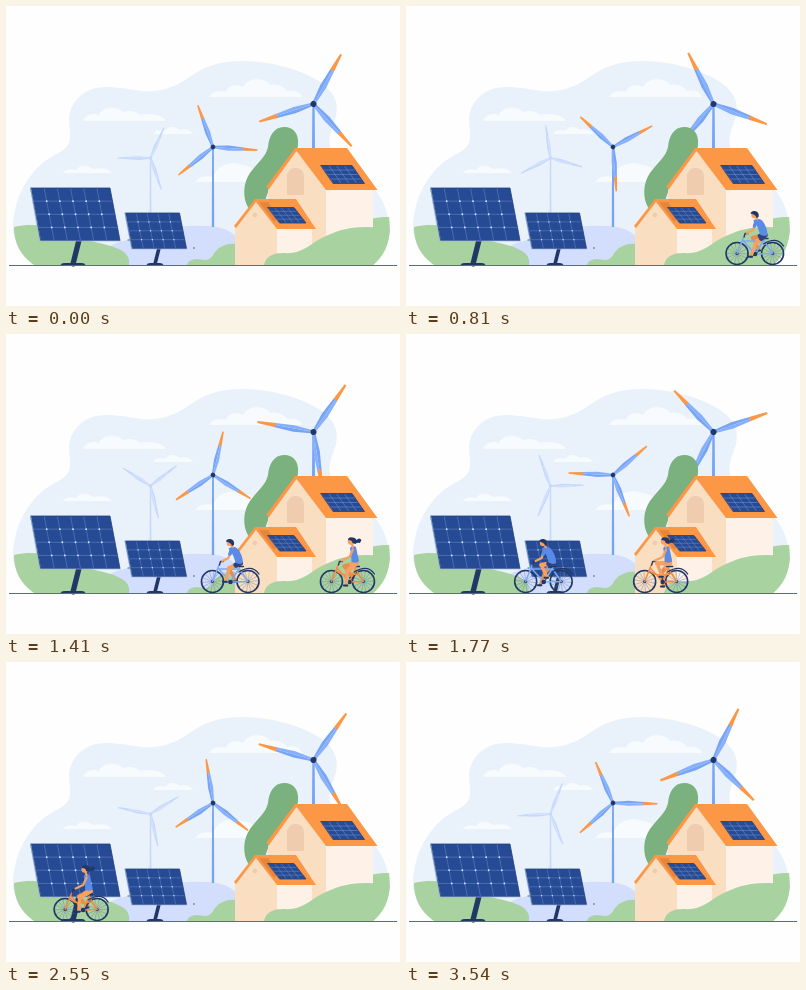
Write an HTML page that moves like this. It is 394x300 px and loops after 3570 ms.

```html
<!DOCTYPE html>
<html lang="en">
<head>
<meta charset="utf-8">
<title>Green energy</title>
<style>
  html, body { margin: 0; width: 100%; height: 100%; overflow: hidden; background: #fefefe; }
  svg { display: block; }
</style>
</head>
<body>
<svg width="394" height="300" viewBox="0 0 394 300">
  <path fill="#e9f2fa" d="M20 245C10 236 7 232 7 222C7 202 14 181 30 163C45 147 63 147 64 132C65 121 59 110 69 96C82 77 104 80 128 84C151 88 168 82 182 72C201 58 218 55 236 55C264 55 293 63 311 74C328 84 333 96 330 110C327 121 322 128 324 140C329 161 355 165 369 184C379 196 383 210 384 225L378 245Z"/>
  <g fill="#f8fbfe">
    <path d="M77 115C80 108 88 107 93 109C97 100 111 100 117 106C124 104 130 105 134 109C145 106 158 110 160 115Z"/>
    <path d="M147 128C150 123 156 124 159 125C162 120 170 120 173 124C180 122 186 125 187 128Z"/>
    <path d="M203 91C206 85 215 84 220 86C223 77 233 79 237 81C242 71 259 71 264 79C272 78 278 80 281 85C289 83 295 87 296 91Z"/>
    <path d="M57 167C60 162 67 163 70 164C74 158 84 159 87 163C95 161 104 163 106 167Z"/>
    <path d="M189 176C194 169 203 170 207 171C211 157 228 155 236 159C246 160 256 167 262 176Z"/>
  </g>
  <path fill="#d3ddfc" d="M88 259C96 235 120 236 139 229C163 220 184 219 203 220C224 222 237 230 246 259Z"/>
  <path fill="#a8d29f" d="M28 259C17 251 8 240 8 221C29 216 53 221 70 230C87 237 98 237 110 242C121 246 124 252 123 259Z"/>
  <path fill="#a8d29f" d="M181 259C183 252 191 253 199 254C207 254 207 246 213 242C219 238 225 237 232 238V259Z"/>
  <path fill="#a8d29f" d="M330 240C345 215 365 211 383 211C386 232 379 248 367 259H330Z"/>
  <g id="turbines"></g>
  <path fill="#7ab17f" d="M243 203C236 192 237 177 244 167C251 157 260 151 262 141C263 130 268 121 278 121C288 121 293 128 292 139L290 150L262 186L258 198Z"/>

  <path fill="#f9dec2" d="M262 184L290 144L320 184V259H262Z"/>
  <path fill="#fef1e7" d="M320 183H367V245H320Z"/>
  <path fill="#fb9745" d="M289 142H341L371.500 184H320L290.500 145L263 183L260 181Z"/>
  <path fill="#efccae" d="M281 189V171C281 159 298 159 298 171V189Z"/>
  <path fill="#f9dec2" d="M229 222L250 195L271 223V259H229Z"/>
  <path fill="#fef1e7" d="M271 222H306V259H271Z"/>
  <path fill="#fb9745" d="M249 193H290L310 223H271L250 196L230 222L228 220Z"/>
  <path fill="#e3873d" d="M253 196H262L272 212L268 216Z"/>
  <circle cx="249" cy="209" r="2.300" fill="#efccae"/>
  <path fill="#a8d29f" d="M258 259C260 250 267 247 277 247C290 248 297 244 306 238C319 229 333 224 345 222C359 220 373 221 384 223C383 239 378 250 367 259Z"/>
  <g id="panels"></g>
  <path fill="none" stroke="#5d6b8a" d="M3 259.500H391"/>
  <g id="riders"></g>
</svg>
<script>
const LOOP = 3570, STEP = 30;
const NAVY = '#213767', SKIN = '#f6a062', BLUE = '#5a8ae6';
const $ = id => document.getElementById(id);
const line = (d, color, width) =>
  `<path d="${d}" fill="none" stroke="${color}" stroke-width="${width}" stroke-linecap="round" stroke-linejoin="round"/>`;
const fill = (d, color) => `<path d="${d}" fill="${color}"/>`;
const dot = (x, y, r, color) => `<circle cx="${x}" cy="${y}" r="${r}" fill="${color}"/>`;

// Parallelogram of solar cells: corner, top edge, side offset
function panel(x, y, w, dx, dy, cols, rows, weight, joint) {
  const at = (u, v) => [x + u * w + v * dx, y + v * dy];
  let grid = '', joints = '';
  for (let i = 1; i < cols; i++) grid += `M${at(i / cols, 0)}L${at(i / cols, 1)}`;
  for (let j = 1; j < rows; j++) {
    grid += `M${at(0, j / rows)}L${at(1, j / rows)}`;
    for (let i = 1; joint && i < cols; i++) joints += dot(...at(i / cols, j / rows), joint, '#dce8fc');
  }
  const edge = `M${at(0, 0)}L${at(1, 0)}L${at(1, 1)}L${at(0, 1)}Z`;
  return fill(edge, '#264b94') + line(grid, '#6d8dcb', weight) + joints + line(edge, '#203f82', .8);
}

const stand = (x, top, lean, half) =>
  line(`M${x + lean} ${top}L${x} 258`, NAVY, half * .42) +
  fill(`M${x - half} 260Q${x - half} 257 ${x - half + 4} 257H${x + half - 4}Q${x + half} 257 ${x + half} 260Z`, NAVY);

$('panels').innerHTML =
  stand(67, 234, 6, 12.5) + panel(25, 182, 79, 10, 52.5, 6, 4, .5, .9) +
  line('M24.500 182L33.500 235H114.500', '#9db7e6', .7) +
  stand(149, 242, 4, 8.5) + panel(119.5, 207, 54, 7, 35.5, 5, 4, .45, .7) +
  line('M119 207L125.500 243H181', '#9db7e6', .6) +
  line('M122 234H123M187.500 242H188.500', NAVY, .8) +
  panel(315, 159.500, 31, 12.500, 18, 4, 4, .6) +
  panel(262, 201.500, 26, 12, 15.500, 4, 4, .5);

const FAINT = ['#c6d8fc', '#d0dffd', '#c6d8fc', '#c6d8fc'];
const BRIGHT = ['#78a4f6', '#86b0fd', '#fb9745', NAVY];
const turbines = [
  { x: 144.5, y: 152, foot: 208, size: 33, start: 161, colors: FAINT },
  { x: 207, y: 141, foot: 221, size: 44.5, start: 231, colors: BRIGHT },
  { x: 307.5, y: 98, foot: 150, size: 57, start: 29, colors: BRIGHT }
];

function turbine({ x, y, foot, size, colors: [dark, light, tip, hub] }) {
  const blade = angle => `<g transform="rotate(${angle})">` +
    fill('M-1.500 0L-3.300 -20L-2.100 -39H0V0Z', dark) + fill('M1.500 0L3.300 -20L2.100 -39H0V0Z', light) +
    fill('M-2.200 -38.500L-1 -57H1L2.200 -38.500Z', tip) + '</g>';
  const w = size / 36;
  return fill(`M${x - w * .7} ${y}H${x + w * .7}L${x + w} ${foot}H${x - w}Z`, dark) +
    `<g class="rotor">${[0, 109, 223].map(blade).join('')}${dot(0, 0, 3, hub)}</g>`;
}
$('turbines').innerHTML = turbines.map(turbine).join('');
const rotors = document.querySelectorAll('.rotor');

function wheel(x, turn) {
  let spokes = '';
  for (let i = 0; i < 14; i++) {
    const a = turn + i * Math.PI / 7;
    spokes += `M${x} 247.500l${11 * Math.cos(a)} ${11 * Math.sin(a)}`;
  }
  return line(spokes, '#66779f', .4) + dot(x, 247.5, 1.5, NAVY) +
    `<circle cx="${x}" cy="247.500" r="11" fill="none" stroke="${NAVY}" stroke-width="1.600"/>`;
}

// Two-bone leg from hip to pedal, knee bending forward
function leg(angle, crankX, hipX, skin, cloth, clothLength) {
  const fx = crankX + 5 * Math.cos(angle), fy = 248 + 5 * Math.sin(angle) - 1;
  const hy = 229, dx = fx - hipX, dy = fy - hy, d = Math.hypot(dx, dy);
  const thigh = 12.5, shin = 13.5;
  const reach = Math.min(d, thigh + shin - .1);
  const bend = Math.acos((thigh ** 2 + reach ** 2 - shin ** 2) / (2 * thigh * reach));
  const a = Math.atan2(dy, dx) + bend;
  const kx = hipX + thigh * Math.cos(a), ky = hy + thigh * Math.sin(a);
  const hem = [hipX + clothLength * Math.cos(a), hy + clothLength * Math.sin(a)];
  return line(`M${crankX} 248L${fx} ${fy + 1}`, NAVY, 1) +
    line(`M${kx} ${ky}L${fx} ${fy}`, skin, 3.2) +
    line(`M${hipX} ${hy}L${kx} ${ky}`, skin, 4.4) +
    line(`M${hipX} ${hy}L${hem}`, cloth, 5) +
    line(`M${fx + 1} ${fy + .6}h-3.500`, NAVY, 2);
}

function rider(x, woman) {
  const gap = woman ? 32 : 35.5, crank = 18, hip = woman ? 25 : 28;
  const turn = x / 11, pedal = x / 22;
  const frame = woman ? '#f58a45' : '#7caaf8', cloth = woman ? SKIN : '#28427f';
  const far = leg(pedal + Math.PI, crank, hip, '#e88d50', cloth, 5);
  const near = leg(pedal, crank, hip, SKIN, cloth, 5);
  const bike = wheel(0, turn) + wheel(gap, turn) +
    line(`M0 247.500L7 230M5.500 234L${crank} 248L${hip - 1} 234M${crank} 248L${gap} 247.500L${hip - 1} 235` +
      (woman ? `M5 237Q11 243 ${hip} 240` : `L5.500 235`), frame, 1.5) +
    line(`M7 231L8 227.500H11M${hip - 3} 232.500h6M${gap - 9} 238Q${gap + 4} 230 ${gap + 11} 240`, NAVY, 1.3) +
    `<circle cx="${crank}" cy="248" r="2.300" fill="${NAVY}"/>`;
  const body = woman
    ? fill('M18.500 214Q21 210.500 24.500 213L27.500 227Q26 230 20 228Q20 220 18.500 214Z', BLUE) +
      line('M20.500 209.500L21.300 213', SKIN, 2.2) + dot(19.5, 207.5, 3.2, SKIN) +
      fill('M16.500 206Q17 202.500 21 203.500Q24 203 25 206Q28 203 30 206L28.500 209Q25.500 208 24 210L21 209Q21 206 16.500 206Z', NAVY) +
      line('M21.500 215.500L18 223L10.500 226.500', SKIN, 2.2)
    : fill('M16 214.500Q21 211 25 214.500Q30 220 30.500 229Q27 231 23 228.500Q21 220 16 214.500Z', BLUE) +
      line('M19 210L20 213.500', SKIN, 2.4) + dot(17.5, 209, 3.3, SKIN) +
      fill('M13.500 207.500Q14 204.500 18 205Q22.500 206 21.500 211L19.500 212Q19 208.500 13.500 207.500Z', NAVY) +
      line('M18.500 216L16 224L10 227', SKIN, 2.3) + line('M19 215.500L17.500 220', BLUE, 3.6);
  return `<g transform="translate(${x})">${far}${bike}${near}${body}</g>`;
}

function draw(now) {
  const t = Math.floor(now % LOOP / STEP) * STEP;
  turbines.forEach(({ x, y, size, start }, i) =>
    rotors[i].setAttribute('transform',
      `translate(${x} ${y}) rotate(${start + 360 * t / LOOP}) scale(${size / 57})`));
  const u = 2 * t / LOOP - 1;
  const x = 116 - 437 * u + 145 * u ** 3;
  $('riders').innerHTML = rider(x, false) + rider(x + 119, true);
}

const begin = performance.now();
function tick() {
  draw(performance.now() - begin);
  requestAnimationFrame(tick);
}
tick();
</script>
</body>
</html>
```
